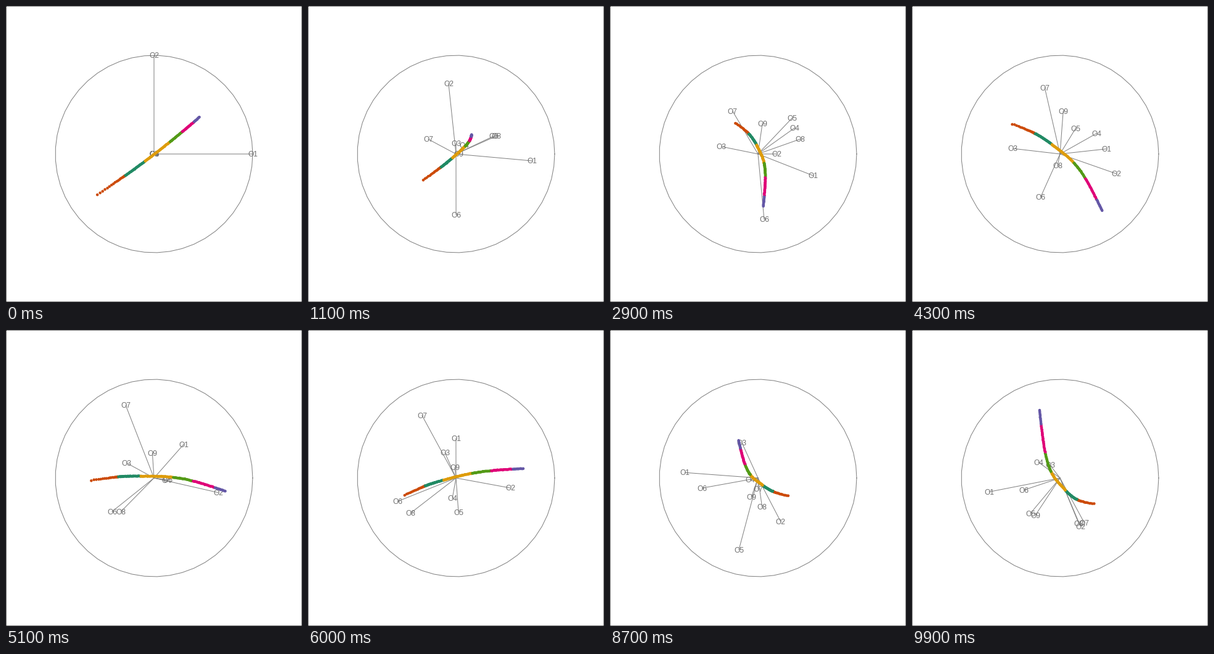
A matplotlib script that plays this animation: 480x480 px, repeating every 10 s.

```python
import numpy as np
import matplotlib.pyplot as plt
from matplotlib.animation import FuncAnimation

SIZE, MID, RADIUS, FRAMES = 480, 240, 160, 100
PX = 0.72  # one pixel in points at 100 dpi
GREY = "#7f7f7f"
COLORS = ["#cc4a08", "#218a64", "#de9c0b", "#539a16", "#df0077", "#6457a6"]


def pose(xs, ys):
    """Nearest orthonormal 9x2 frame to the given axis tips."""
    u, _, vt = np.linalg.svd(np.array([xs, ys], float).T, full_matrices=False)
    return u @ vt


def turn(a, b, t):
    """Geodesic from frame a (t=0) to frame b (t=1); t may run outside."""
    u, c, vt = np.linalg.svd(a.T @ b)
    tau = np.arccos(np.clip(c, -1, 1))
    ga, gb = a @ u, b @ vt.T
    s = np.where(tau > 1e-6, np.sin(tau), 1)
    path = ga * np.cos(t * tau) + (gb - ga * np.cos(tau)) / s * np.sin(t * tau)
    q = u @ vt
    spin = t * np.arctan2(q[1, 0], q[0, 0])
    cs, sn = np.cos(spin), np.sin(spin)
    return path @ u.T @ np.array([[cs, -sn], [sn, cs]])


# One key pose per leg of the tour: tips of the nine axes
start = np.eye(9, 2)
a = pose([123, -12, 0, 13, 61, 0, -45, 65, 4],
         [-11, 114, 17, 14, 29, -98, 24, 29, 0])
b = pose([89, 30, -59, 59, 55, 10, -41, 68, 7],
         [-35, 0, 12, 42, 58, -105, 69, 24, 49])
c = pose([75, 91, -76, 59, 25, -31, -25, -4, 5],
         [8, -32, 9, 33, 41, -69, 107, -19, 69])
d = pose([0, 88, -18, -6, 4, -95, -55, -74, -2],
         [64, -16, 41, -33, -56, -38, 101, -57, 17])
e = pose([-95, 22, -20, 12, -30, -109, -41, -26, 20],
         [16, -20, 64, -36, -128, -20, 51, 8, 13])
f = pose([-115, 33, -16, -35, -48, -59, 39, 30, -40],
         [-23, -79, 21, 26, -58, -20, -73, -74, -61])

# Turning points follow from constant speed on each leg
ab = turn(start, a, 18 / 11)
de = turn(e, f, -1 / 23)
cd = turn(d, de, -3 / 13)
bc = turn(turn(ab, b, 1.7), turn(c, cd, -6 / 13), 0.5)
ef = turn(e, f, 14 / 23)

# Each turning point is held for two frames
KEYS = [(0, start), (11, a), (18, ab), (19, ab), (29, b), (36, bc), (37, bc),
        (43, c), (56, cd), (57, cd), (60, d), (73, de), (74, de), (75, e),
        (89, ef), (90, ef), (99, f)]


def frame_at(n):
    for (i, p), (j, q) in zip(KEYS, KEYS[1:]):
        if n <= j:
            return turn(p, q, (n - i) / (j - i))


# Four knots of the point curve (x + iy) as each pose shows them
SEEN = [
    (start, [-91 - 66j, -15 - 12j, 46 + 36j, 74 + 60j]),
    (a, [-53 - 42j, -6 - 6j, 22 + 22j, 25 + 31j]),
    (b, [-37 + 50j, -2 + 14j, 12 - 39j, 9 - 85j]),
    (c, [-77 + 48j, -14 + 16j, 41 - 39j, 68 - 92j]),
    (d, [-84 - 28j, -21 - 3j, 56 + 12j, 110 + 15j]),
    (e, [29 + 8j, 4 + 4j, -11 - 13j, -17 - 28j]),
    (f, [55 - 42j, 9 - 20j, -24 + 41j, -33 + 111j]),
]


def spline(t, knots, values):
    """Cubic Hermite curve with quadratic-fit tangents."""
    h = np.diff(knots)[:, None]
    slope = np.diff(values, axis=0) / h
    inner = (slope[:-1] * h[1:] + slope[1:] * h[:-1]) / (h[1:] + h[:-1])
    tan = np.vstack([1.5 * slope[0] - 0.5 * inner[0], inner,
                     1.5 * slope[-1] - 0.5 * inner[-1]])
    k = np.clip(np.searchsorted(knots, t) - 1, 0, len(h) - 1)
    s = (t[:, None] - knots[k][:, None]) / h[k]
    w = s * s * (3 - 2 * s)
    bend = s * (1 - s) * ((1 - s) * tan[k] - s * tan[k + 1])
    return values[k] * (1 - w) + values[k + 1] * w + h[k] * bend


def build_cloud():
    """Recover the nine-dimensional curve and place points along it."""
    views = np.vstack([p.T for p, _ in SEEN])
    tips = np.vstack([[np.real(z), np.imag(z)] for _, z in SEEN])
    values = np.linalg.lstsq(views, tips, rcond=0.15)[0].T
    t = np.concatenate([-47 - 44 * np.linspace(1, 0, 20) ** 1.9,
                        np.arange(-46, 74, 0.7)])
    group = np.searchsorted([-47, -15, 26, 46, 65], t)
    x = spline(t, tips[0], values)
    x += np.random.default_rng(4).normal(0, 0.2, x.shape)
    return x, [COLORS[g] for g in group]


cloud, cloud_colors = build_cloud()

fig = plt.figure(figsize=(SIZE / 100, SIZE / 100), dpi=100, facecolor="white")
ax = fig.add_axes([0, 0, 1, 1])
ax.set(xlim=(0, SIZE), ylim=(SIZE, 0))
ax.axis("off")


def stroke(xs, ys, color=GREY):
    return ax.plot(xs, ys, color=color, lw=PX, snap=False, clip_on=False)[0]


stroke([0, SIZE, SIZE, 0, 0], [0, 0, SIZE, SIZE, 0], "black")
theta = np.linspace(0, 2 * np.pi, 50)
stroke(MID + RADIUS * np.cos(theta), MID - RADIUS * np.sin(theta))

spokes = [stroke([], []) for _ in range(9)]
labels = [ax.text(MID, MID, f"O{i + 1}", color="#6e6e6e", fontsize=12 * PX,
                  family="Liberation Sans", ha="center", va="baseline", zorder=3)
          for i in range(9)]
dots = ax.scatter(np.zeros(len(cloud)), np.zeros(len(cloud)), c=cloud_colors,
                  s=(4.5 * PX) ** 2, linewidths=0, zorder=4)


def to_screen(p):
    return MID + p * [1, -1]


def update(n):
    view = frame_at(n)
    for line, text, (x, y) in zip(spokes, labels, to_screen(view * RADIUS)):
        line.set_data([MID, x], [MID, y])
        text.set_position((x, y + 4.3))
    dots.set_offsets(to_screen(cloud @ view))
    return [*spokes, *labels, dots]


anim = FuncAnimation(fig, update, frames=FRAMES, interval=100,
                     repeat=True, repeat_delay=0)
plt.show()
```
